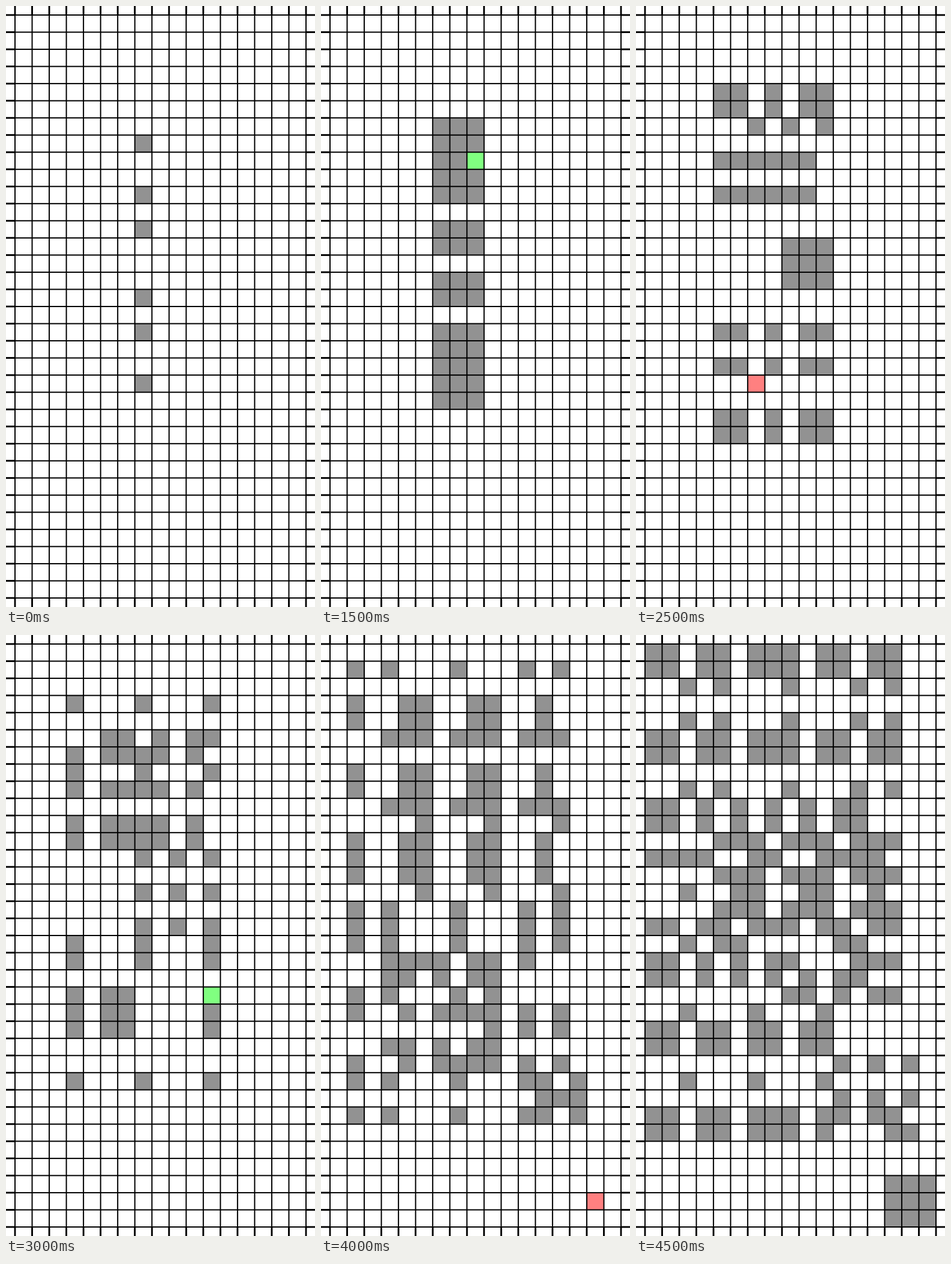
An HTML page with a canvas that plays this animation: 515x1000 px, repeating every 6 s.

```html
<!DOCTYPE html>
<html>
<head>
<meta charset="utf-8">
<title>Replicator automaton with flipped cells</title>
<style>
  html, body { margin: 0; overflow: hidden; }
  canvas { display: block; }
</style>
</head>
<body>
<canvas id="stage" width="515" height="1000"></canvas>
<script>
const ctx = document.getElementById("stage").getContext("2d");
const COLS = 17, ROWS = 34, MARGIN = 15, PITCH = 485 / COLS;
const SEED_COLUMN = 7, SEED_ROWS = [7, 10, 12, 16, 18, 21];
// One [column, row] flipped after each generation.
const FLIPS = [null, [8, 8], [9, 14], [6, 21], [11, 20], [13, 26], [15, 32], null];

const edge = i => MARGIN + i * PITCH;
const emptyGrid = () => Array.from({ length: ROWS }, () => Array(COLS).fill(0));

// A cell lives when its 3x3 neighbourhood holds an odd number of live cells.
function evolve(grid) {
  return grid.map((line, r) => line.map((_, c) => {
    let parity = 0;
    for (let y = r - 1; y <= r + 1; y++)
      for (let x = c - 1; x <= c + 1; x++) parity ^= grid[y]?.[x] ?? 0;
    return parity;
  }));
}

const seed = emptyGrid();
for (const r of SEED_ROWS) seed[r][SEED_COLUMN] = 1;
const generations = [seed];
for (let n = 1; n < FLIPS.length; n++) {
  const grid = evolve(generations[n - 1]);
  if (FLIPS[n]) {
    const [c, r] = FLIPS[n];
    grid[r][c] ^= 1;
  }
  generations.push(grid);
}

function fillCell(c, r, color) {
  ctx.fillStyle = color;
  ctx.fillRect(edge(c), edge(r), PITCH, PITCH);
}

function drawGrid() {
  const right = edge(COLS), bottom = edge(ROWS);
  const bar = (x, y, w, h) => ctx.fillRect(x, y, w, h);
  ctx.fillStyle = "#000";
  for (let c = 0; c <= COLS; c++) {
    bar(edge(c) - 1, 0, 2, 1000);
    bar(edge(c) - 1.4, 0, 2.8, MARGIN - 1);
    bar(edge(c) - 1.4, bottom + 1, 2.8, MARGIN);
  }
  for (let r = 0; r <= ROWS; r++) {
    bar(0, edge(r) - 1, 515, 2);
    bar(0, edge(r) - 1.4, MARGIN - 1, 2.8);
    bar(right + 1, edge(r) - 1.4, MARGIN, 2.8);
  }
}

function draw(n) {
  const grid = generations[n];
  ctx.fillStyle = "#fff";
  ctx.fillRect(0, 0, 515, 1000);
  grid.forEach((line, r) => line.forEach((alive, c) => {
    if (alive) fillCell(c, r, "#929292");
  }));
  if (FLIPS[n]) {
    const [c, r] = FLIPS[n];
    fillCell(c, r, grid[r][c] ? "#ff8080" : "#80ff80");
  }
  drawGrid();
}

function tick() {
  const time = performance.now() % 6000;
  draw(Math.min(7, Math.max(0, Math.floor((time - 1000) / 500))));
  requestAnimationFrame(tick);
}
tick();
</script>
</body>
</html>
```
